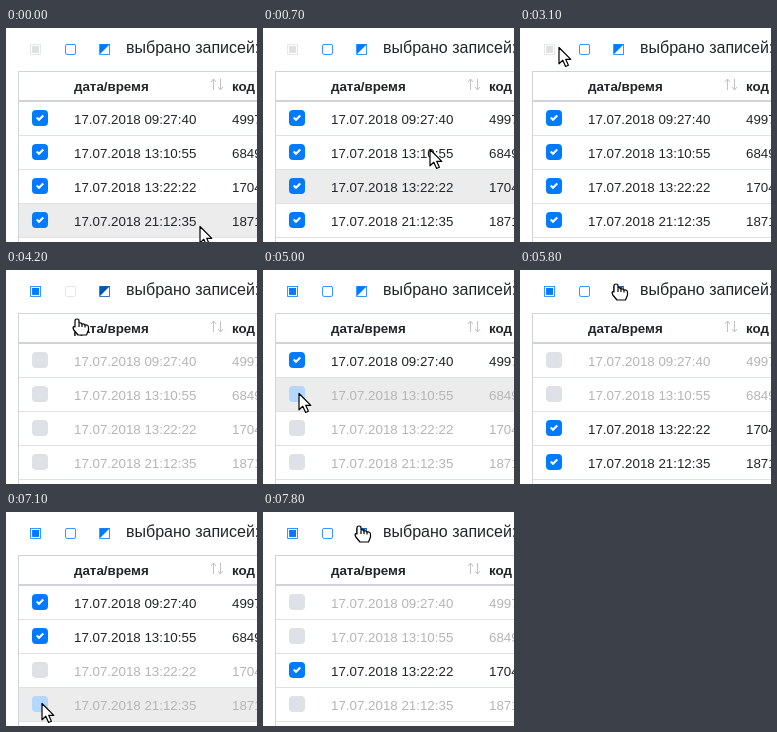
An HTML page that plays this animation: 251 by 214 pixels, repeating every 8000 ms.

```html
<!DOCTYPE html>
<html lang="ru">
<head>
<meta charset="utf-8">
<style>
html, body { margin: 0; width: 100%; height: 100%; overflow: hidden; background: #fff; }
svg { display: block; width: 251px; height: 214px; font: 13.33px "Liberation Sans", Arial, sans-serif; fill: #212529; }
.icon { font: 14px "DejaVu Sans", sans-serif; }
.title { font-size: 16px; }
.head { font-weight: bold; }
.line { fill: #dee2e6; }
.edge { fill: #d0d4d8; }
.sort { fill: none; stroke: #bfc1c3; }
.tick { fill: #fff; }
.cursor { fill: #fff; stroke: #000; stroke-width: 1.2; stroke-linejoin: round; }
</style>
</head>
<body>
<svg viewBox="0 0 251 214">
  <text class="icon" x="23" y="25">▣</text>
  <text class="icon" x="58" y="25">▢</text>
  <text class="icon" x="92" y="25">◩</text>
  <text class="title" x="120" y="25">выбрано записей:</text>
  <g id="rows"></g>
  <rect class="edge" x="12" y="43" width="239" height="1"/>
  <rect class="edge" x="12" y="72" width="239" height="2"/>
  <rect class="edge" x="12" y="43" width="1" height="171"/>
  <text class="head" x="68" y="63">дата/время</text>
  <text class="head" x="226" y="63">код</text>
  <path class="sort" d="M207.5 62V51M205 54l2.5-3 2.5 3M214.5 51v11M212 59l2.5 3 2.5-3"/>
  <g id="cursor" class="cursor">
    <path id="arrow" transform="translate(1 1.5)" d="M0 0V16.3L3.8 12.8 6.6 19 9.4 17.8 6.7 11.8H11.8Z"/>
    <g id="hand" transform="translate(-5 -4)">
      <path d="M2 2Q2 0 4 0T6 2V4Q8.5 3.5 9 5 11.5 4.5 12 6 15.5 5.5 15.5 8.5V11L13.5 16H5L.8 11Q-.6 8.5 .8 7.5L2 8Z"/>
      <path d="M6 4.5V8M9 5V8M12 6V8.5" fill="none"/>
    </g>
  </g>
</svg>
<script>
const LOOP = 8000, STEP = 100, PITCH = 34, ALL = 15;
const BLUE = [0, 123, 255], DARK = [0, 86, 179], GRAY = [108, 117, 125];
const data = [
  ["17.07.2018 09:27:40", "4997"], ["17.07.2018 13:10:55", "6849"],
  ["17.07.2018 13:22:22", "1704"], ["17.07.2018 21:12:35", "1871"]
];

const button = i => [37 + 30 * i, 18];
const check = i => [35, 88 + PITCH * i];
const home = [193, 197];
// start, end, destination of the pointer
const moves = [
  [300, 1100, [126, 42]], [1200, 1300, [79, 37]], [1400, 1500, button(1)],
  [1800, 2200, button(0)], [3000, 3700, button(2)],
  [3900, 4500, check(0)], [4600, 4800, check(1)], [5100, 5600, button(2)],
  [6300, 6600, [27, 144]], [6600, 6900, check(3)], [7200, 7700, button(2)]
];

const all = () => ALL;
const none = () => 0;
const invert = mask => mask ^ ALL;
const toggle = i => mask => mask ^ 1 << i;
const clicks = [
  [1600, none], [2600, all], [3800, invert], [4600, toggle(0)], [5100, toggle(1)],
  [5700, invert], [6200, invert], [7200, toggle(3)], [7800, invert]
];

const $ = id => document.getElementById(id);
const icons = [...document.querySelectorAll(".icon")];

$("rows").innerHTML = data.map(([date, code], i) => `<g transform="translate(0 ${74 + i * PITCH})">
  <rect class="back" x="13" width="238" height="33" fill="#ececec"/>
  <rect class="line" x="12" y="33" width="239" height="1"/>
  <rect class="box" x="26" y="8" width="16" height="16" rx="4"/>
  <path class="tick" transform="translate(30 12)" d="M6.56.75L2.97 4.36 1.44 2.81 0 4.26 2.97 7.25 8 2.19Z"/>
  <g class="label"><text x="68" y="21.5">${date}</text><text x="226" y="21.5">${code}</text></g>
</g>`).join("");
const rows = [...$("rows").children].map(g =>
  Object.fromEntries(["back", "box", "tick", "label"].map(k => [k, g.querySelector("." + k)])));

// eased moves; x starts a little later than y, which bends the path
function tip(t) {
  let [x, y] = home;
  for (const [start, end, [toX, toY]] of moves) {
    const k = Math.min(1, Math.max(0, (t - start) / (end - start)));
    const ease = k * k * (3 - 2 * k);
    x += (toX - x) * ease ** 1.3;
    y += (toY - y) * ease;
  }
  return [x, y];
}

const picked = t => clicks.reduce((mask, [at, act]) => at <= t ? act(mask) : mask, ALL);
const disabled = (i, t) => picked(t) === [ALL, 0][i];

// hover trails the pointer by one step
function hoveredButton(t) {
  const [x, y] = tip(t - STEP);
  const i = Math.round((x - 29.5) / 34.5);
  return y < 37 && i < 3 && !disabled(i, t) ? i : -1;
}
const hoveredRow = t => Math.floor((tip(t - STEP)[1] - 73) / PITCH);
const tint = (i, t) => disabled(i, t) ? GRAY : hoveredButton(t) === i ? DARK : BLUE;

function draw(t) {
  icons.forEach((icon, i) => {
    const before = tint(i, t - STEP), now = tint(i, t);
    icon.style.fill = `rgb(${now.map((c, j) => Math.round((c + before[j]) / 2))})`;
    icon.style.opacity = disabled(i, t) ? 0.22 : 1;
  });

  const mask = picked(t), changing = mask ^ picked(t + STEP), over = hoveredRow(t);
  rows.forEach((row, i) => {
    const on = mask >> i & 1;
    const pressed = over === i && changing >> i & 1;
    row.back.style.opacity = +(over === i);
    row.box.style.fill = pressed ? "#b3d7ff" : on ? "#007bff" : "#dee2e6";
    row.tick.style.opacity = on;
    row.label.style.fill = on ? "#212529" : "#b5b5b5";
  });

  const hand = hoveredButton(t) >= 0;
  $("hand").style.opacity = +hand;
  $("arrow").style.opacity = +!hand;
  $("cursor").setAttribute("transform", `translate(${tip(t).map(Math.round)})`);
}

const start = performance.now();
function frame() {
  const t = (performance.now() - start) % LOOP;
  draw(Math.floor(t / STEP) * STEP);
  requestAnimationFrame(frame);
}
frame();
</script>
</body>
</html>
```
